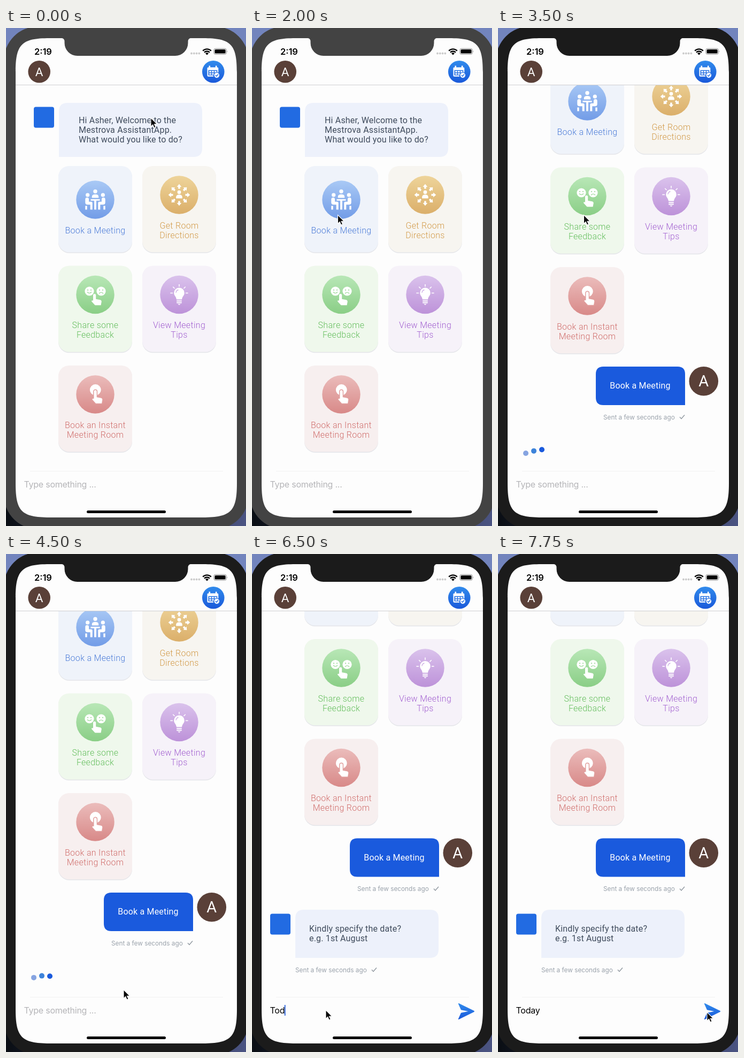
Recreate the animation shown at these times as an HTML page. Size 449 by 931 pixels, loop 8 s.

```html
<!DOCTYPE html>
<html lang="en">
<head>
<meta charset="utf-8">
<title>Meeting assistant chat</title>
<style>
  html, body { margin: 0; width: 100%; height: 100%; overflow: hidden; background: #7284bd; }
  svg { display: block; position: fixed; left: 0; top: 0; }
  .body { font: 16px Roboto, sans-serif; letter-spacing: .18px; }
  .label { font: 300 16px Roboto, sans-serif; letter-spacing: .3px; }
  .ui { font: 16px Inter, sans-serif; letter-spacing: -.25px; }
  .note { font: 11.8px Inter, sans-serif; fill: #9ba3ac; }
  .clock { font: 600 16.4px Inter, sans-serif; }
  .initial { font-family: Roboto, sans-serif; fill: #fff; }
  .mid { text-anchor: middle; }
</style>
</head>
<body>
<svg id="stage" width="449" height="931" viewBox="0 0 449 931"></svg>
<script>
const LOOP = 8000, STEP = 250;

const themes = {
  blue:   { card: '#eff3fa', text: '#4d7dd8', top: '#a9c9f5', low: '#729ce7' },
  gold:   { card: '#f7f5f0', text: '#d29a48', top: '#eed49a', low: '#dbaf6a' },
  green:  { card: '#eff8ec', text: '#62bd5b', top: '#b8e7b6', low: '#8ace86' },
  purple: { card: '#f6f2f9', text: '#a260d0', top: '#dac2ec', low: '#bd92d9' },
  red:    { card: '#f7efef', text: '#d06d6b', top: '#ebbcbb', low: '#d88988' }
};

const repeat = (n, fn) => Array.from({ length: n }, (_, i) => fn(i)).join('');

const gradient = (id, top, low) =>
  `<linearGradient id="${id}" x1="0" y1="0" x2="0" y2="1">
    <stop stop-color="${top}"/><stop offset="1" stop-color="${low}"/></linearGradient>`;

const dot = (x, y, r, extra = '') => `<circle cx="${x}" cy="${y}" r="${r}" ${extra}/>`;

const lines = (x, y, rows, extra) =>
  rows.map((s, i) => `<text x="${x}" y="${y + i * 18}" ${extra}>${s}</text>`).join('');

// Rectangle whose corners ease into the straight sides
function smoothRect(x, y, w, h, r) {
  const c = r * 1.528, k = c * .822, e = c - k, dx = w - 2 * c, dy = h - 2 * c;
  return `M${x + c} ${y}h${dx}c${k} 0 ${c} ${e} ${c} ${c}v${dy}c0 ${k} ${-e} ${c} ${-c} ${c}` +
    `h${-dx}c${-k} 0 ${-c} ${-e} ${-c} ${-c}v${-dy}c0 ${-k} ${e} ${-c} ${c} ${-c}z`;
}

// Icons are white and centred on 0,0
const pointing = reach => `<path d="M-4 ${8.2 - reach}a2.6 2.6 0 0 1 5.2 0v${reach}l8 1.6q2.8.7 2.5 3.4
  l-1.2 6.6H-.4l-6.8-7.6q1-2.6 4-.8l-.8.4z"/>`;

const face = (x, mood, ink) => dot(x, -6.5, 8.6) +
  dot(x - 3, -8.7, 1.1, `fill="${ink}"`) + dot(x + 3, -8.7, 1.1, `fill="${ink}"`) +
  `<path d="M${x - 4} ${mood > 0 ? -5 : -2}q4 ${mood * 4.5} 8 0" fill="none" stroke="${ink}" stroke-width="1.2"/>`;

const sitter = `${dot(-14.3, -8.8, 3.6)}
  <path d="M-18.7-.6a3.4 3.4 0 0 1 6.8 0v4.4h4q2.6 0 2.6 2.6V18.5h-4V9.3h-5.400q-4 0-4-4zM-18.7 11.500h3.400v7h-3.400z"/>`;

const icons = {
  blue: () => `${dot(0, -15.5, 3.7)}<path d="M-6.2-3.600v-2q0-4.400 6.200-4.400t6.200 4.400v2z"/>
    <path d="M-8.500-1h17v2.800h-6.600V18.500h-3.800V1.800h-6.600z"/>${sitter}<g transform="scale(-1 1)">${sitter}</g>`,
  gold: () => dot(0, -5, 3.4) +
    '<path d="M-5.8 6.5V4.2Q-5.8-.5 0-.5t5.8 4.7v2.3z"/>' +
    repeat(8, i => `<path transform="rotate(${i * 45})" d="M0-20.3l4.4 5.2h-2.6v3.6h-3.6v-3.6h-2.6z"/>`),
  green: () => face(-11, 1, '#9ad896') + face(11, -1, '#9ad896') + pointing(7.2),
  purple: () => `<path d="M0-13a9.8 9.8 0 0 1 9.8 9.8c0 5.2-4 6.2-4.8 12.2H-5c-.8-6-4.8-7-4.8-12.2A9.8 9.8 0 0 1 0-13z"/>
    <path d="M-6-3.5a6 6 0 0 1 4.5-5.5" fill="none" stroke="#cfb0e5" stroke-width="1.3"/>
    <path d="M-4.8 10.7h9.6v2h-9.6zM-4.8 14.1h9.6v1.9h-9.6zM-2.8 17.2h5.6L0 19.4z"/>` +
    repeat(5, i => `<path transform="rotate(${(i - 2) * 45} 0 -3)" d="M-.8-19.6h1.6v4.6h-1.6z"/>`),
  red: () => dot(.3, -8.5, 10.4) +
    `<g transform="translate(1.5 -3)" stroke="#e19f9e" stroke-width="3" paint-order="stroke">${pointing(10.5)}</g>`
};

function card(x, y, hue, ...label) {
  const t = themes[hue], one = label.length == 1, cy = one ? 63 : 54;
  return `<g transform="translate(${x} ${y})">
    <rect y="1.2" width="138" height="161.5" rx="20" fill="#e4e5e9"/>
    <rect width="138" height="161.2" rx="20" fill="${t.card}"/>
    <g transform="translate(69 ${cy})" fill="#fff">${dot(0, 0, 35.7, `fill="url(#${hue})"`)}${icons[hue]()}</g>
    ${lines(69, one ? 125.8 : 116.6, label, `class="label mid" fill="${t.text}"`)}</g>`;
}

const initial = (x, y, r, size) => dot(x, y, r, 'fill="#5a4038"') +
  `<text class="initial mid" x="${x}" y="${y + size * .355}" font-size="${size}">A</text>`;

const bubble = (x, y, w, h) =>
  `<path fill="#edf1fb" d="M${x} ${y + h}v${16 - h}q0-16 16-16h${w - 32}q16 0 16 16v${h - 32}q0 16-16 16z"/>`;

const bot = (x, y) => `<rect x="${x}" y="${y}" width="38" height="39" rx="4" fill="#226be2"/>`;

const sent = (x, y) => `<text class="note" x="${x}" y="${y}">Sent a few seconds ago</text>
  <path d="M${x + 143} ${y - 4.2}l3 3.2 6-7" fill="none" stroke="#8f979f" stroke-width="1.4"/>`;

const chat = `
  ${bot(52, 147.5)}${bubble(99, 140, 268, 101)}
  ${lines(136, 177.8, ['Hi Asher, Welcome to the', 'Mestrova AssistantApp.', 'What would you like to do?'], 'class="body" fill="#3f4b5c"')}
  ${card(98, 258, 'blue', 'Book a Meeting')}
  ${card(255, 258, 'gold', 'Get Room', 'Directions')}
  ${card(98, 444.5, 'green', 'Share some', 'Feedback')}
  ${card(255, 444.5, 'purple', 'View Meeting', 'Tips')}
  ${card(98, 631, 'red', 'Book an Instant', 'Meeting Room')}
  <g id="asked">
    <path fill="#1a5add" d="M350 889H197q-14 0-14-14v-44q0-14 14-14h139q14 0 14 14z"/>
    <text class="body mid" x="266" y="858" fill="#fff">Book a Meeting</text>
    ${initial(384.8, 844.2, 27.3, 29)}${sent(197, 915.5)}
  </g>
  <g id="reply">
    ${bot(34, 958)}${bubble(81, 950.5, 268, 90)}
    ${lines(107, 991.8, ['Kindly specify the date?', 'e.g. 1st August'], 'class="body" fill="#3f4b5c"')}
    ${sent(81, 1067)}
  </g>`;

const statusBar = `
  <text class="clock" x="53" y="50">2:19</text>
  ${repeat(4, i => dot(347 + i * 4.8, 47.5, 1.9, 'fill="#cbcbcb"'))}
  <g fill="none" stroke="#000" stroke-width="2.3">
    <path d="M368.2 42.6a11 11 0 0 1 15.6 0M371 45.6a7 7 0 0 1 10 0"/></g>
  <path d="M373 47.4a4.3 4.3 0 0 1 6 0l-3 3z"/>
  <rect x="388.9" y="38.4" width="23.4" height="10.8" rx="3" fill="none" stroke="#8d8d8d"/>
  <rect x="390.5" y="40" width="20.2" height="7.6" rx="1.7"/>
  <path d="M413.6 42q1.8 1.8 0 3.8z" fill="#8d8d8d"/>`;

const calendar = `${dot(387.8, 81.8, 20.8, 'fill="url(#action)"')}
  <g fill="#fff"><path d="M379.5 70.5h2.6v3h9.8v-3h2.6v3h1q1.8 0 1.8 1.8V83h-2v-4.3h-16.8v9.8H388v2.2h-9.6q-1.9 0-1.9-1.9V75.3q0-1.8 1.8-1.8h1.2z"/>
  ${repeat(6, i => `<rect x="${380.2 + i % 3 * 5}" y="${80.3 + (i > 2) * 4.2}" width="3.6" height="2.7"/>`)}
  ${dot(394.3, 88.3, 5.2, 'stroke="#226be2"')}</g>
  <path d="M391.8 88.3l1.9 1.9 3.3-3.7" fill="none" stroke="#226be2" stroke-width="1.4"/>`;

const stage = document.getElementById('stage');
stage.innerHTML = `
  <defs>
    ${Object.entries(themes).map(([id, t]) => gradient(id, t.top, t.low)).join('')}
    ${gradient('action', '#318bec', '#1a59da')}
    <linearGradient id="floor"><stop stop-color="#0a0e14"/><stop offset=".5" stop-color="#2a3150"/>
      <stop offset="1" stop-color="#4b5482"/></linearGradient>
    <clipPath id="view"><rect x="18" y="107" width="414" height="721"/></clipPath>
  </defs>
  <rect width="449" height="500" fill="#7284bd"/>
  <rect y="500" width="449" height="431" fill="url(#floor)"/>
  <rect id="bezel" x="-4" y="-3" width="458" height="940" rx="64"/>
  <path d="${smoothRect(18, 19, 414, 896, 41.5)}" fill="#fdfdfd"/>
  <path id="notch" d="M103 18.5q6.5.5 6.5 7v2.500a24 24 0 0 0 24 24h183a24 24 0 0 0 24-24v-2.500q0-6.500 6.500-7z"/>
  ${statusBar}
  ${initial(62.2, 81.8, 20.8, 22.5)}${calendar}
  <g clip-path="url(#view)"><g id="chat">${chat}</g></g>
  <g id="dots">${dot(52, 792, 5, 'fill="#86a4e1"')}${dot(67, 789, 5, 'fill="#3d83da"')}${dot(82, 789, 5, 'fill="#1a5add"')}</g>
  <path d="M18 106.5h414" stroke="#cfcfd1"/>
  <path d="M45 828.5h361" stroke="#f1f1f2"/>
  <text id="input" class="ui" x="33.5" y="859.3"></text>
  <rect id="caret" y="843" width="2" height="20" fill="#3c70df"/>
  <path id="send" fill="url(#action)" d="M387 840q-1.5-.5-1 1l5 11.2 13.5 2.8-13.5 2.8-5 11.2q-.5 1.5 1 1l28.500-14q1.5-1 0-2z"/>
  <rect x="151" y="902" width="148" height="5" rx="2.5"/>
  <path id="pointer" stroke="#fff" stroke-width="1.1" d="M0 0v16.3l3.7-3.5 2.5 5.8 2.8-1.2-2.5-5.6h5.2z"/>`;

const $ = id => document.getElementById(id);
const [bezel, notch, feed, asked, reply, dots, input, caret, send, pointer] =
  ['bezel', 'notch', 'chat', 'asked', 'reply', 'dots', 'input', 'caret', 'send', 'pointer'].map($);

// [time, x, y]
const pointerStops = [
  [0, 271, 168], [250, 188, 243], [500, 147, 345], [750, 146, 356], [1500, 160, 309],
  [1750, 161, 344], [2000, 160.5, 349.5], [3750, 265, 482], [4000, 261, 615], [4250, 261, 617],
  [4500, 220, 814.5], [4750, 155, 840.5], [5000, 139, 851], [5250, 138, 852.5],
  [7250, 348, 867], [7500, 430, 848], [7750, 391, 856.5]
];
const scrollStops = [[0, 0], [3500, 184], [4750, 285.5]];
const typedStops = [[0, 0], [6250, 1], [6500, 3], [6750, 4], [7000, 5]];

const at = (stops, t) => stops.filter(s => s[0] <= t).pop().slice(1);
const show = (el, on) => el.setAttribute('visibility', on ? 'visible' : 'hidden');

function draw(time) {
  const t = Math.floor(time % LOOP / STEP) * STEP;

  const frame = t < 3250 ? '#434343' : '#1b1b1b';
  bezel.setAttribute('fill', frame);
  notch.setAttribute('fill', frame);

  feed.setAttribute('transform', `translate(0 ${-at(scrollStops, t)[0]})`);
  show(asked, t >= 3500);
  show(reply, t >= 4750);

  show(dots, t >= 3500 && t < 4750);
  [...dots.children].forEach((d, i) =>
    d.setAttribute('cy', 792.8 - 4.5 * Math.sin(.2 + i + (t - 4500) * 2 * Math.PI / 900)));

  const typed = at(typedStops, t)[0];
  input.textContent = typed ? 'Today'.slice(0, typed) : 'Type something ...';
  input.setAttribute('fill', typed ? '#000' : '#b5b5b8');
  show(send, typed);
  show(caret, t >= 5500 && t < 6000 || t >= 6250 && t < 7750);
  caret.setAttribute('x', 33 + (typed ? input.getComputedTextLength() : 0));

  const [x, y] = at(pointerStops, t);
  pointer.setAttribute('transform', `translate(${x} ${y})`);
}

let start;
function tick(now) {
  start ??= now;
  draw(now - start);
  requestAnimationFrame(tick);
}
draw(0);
requestAnimationFrame(tick);
</script>
</body>
</html>
```
